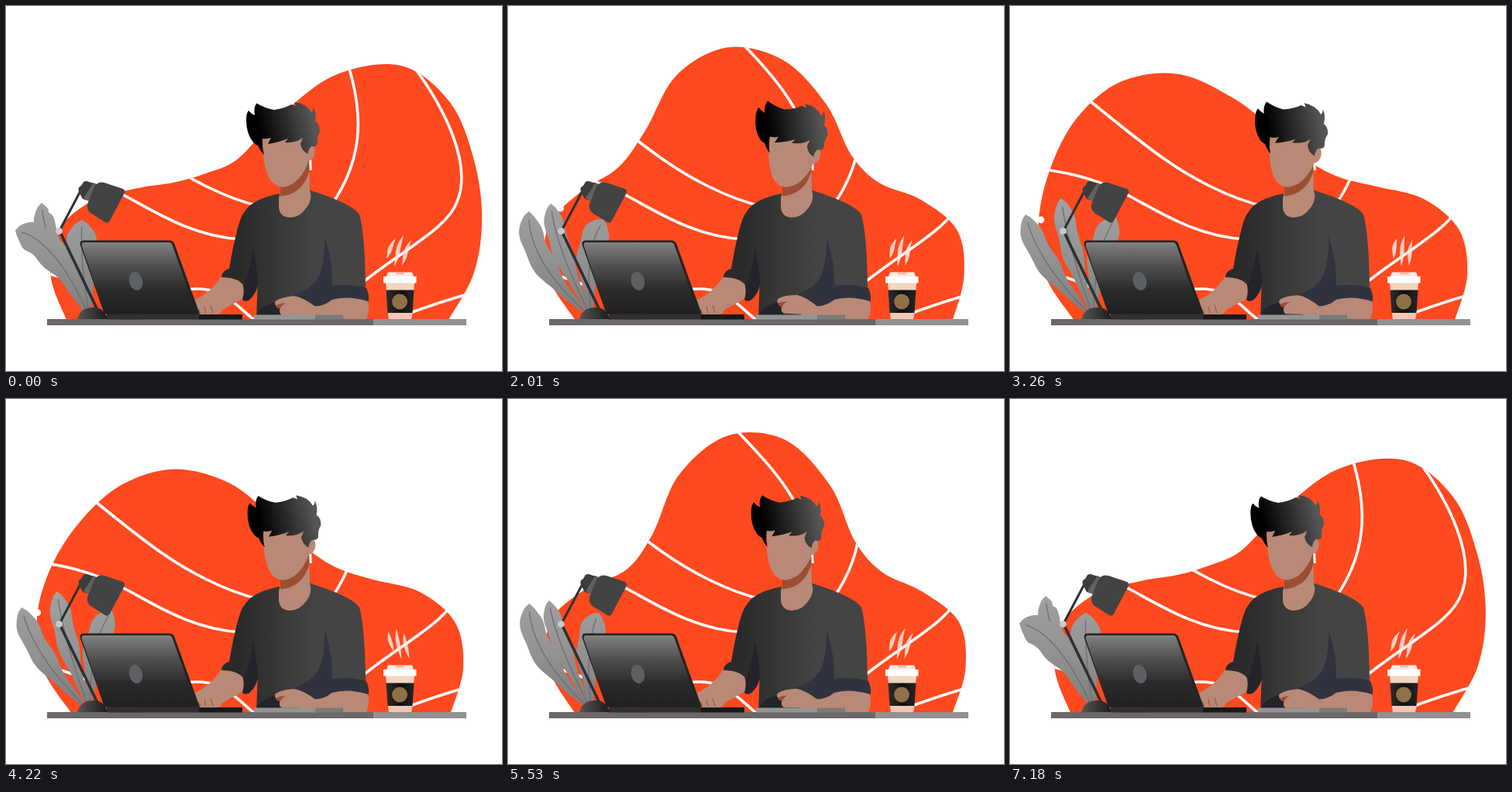
These frames come from a looping animation (640x471 px, 7200 ms). An HTML page with a canvas:

```html
<!DOCTYPE html>
<html lang="en">
<head>
<meta charset="utf-8">
<title>Working at a desk</title>
<style>
html, body { margin: 0; width: 100%; height: 100%; overflow: hidden; background: #fff; }
canvas { display: block; width: 640px; height: 471px; }
</style>
</head>
<body>
<canvas id="stage"></canvas>
<script>
const LOOP = 7200, W = 640, H = 471;
const canvas = document.getElementById('stage');
const ratio = window.devicePixelRatio || 1;
canvas.width = W * ratio;
canvas.height = H * ratio;
const ctx = canvas.getContext('2d');

const lerp = (a, b, k) => a + (b - a) * k;
// 0 -> 1 -> 0 at constant speed
const wave = (t, period) => 1 - Math.abs(1 - 2 * (t % period) / period);

// Straight blend between evenly spaced poses
function blend(poses, pos) {
  const i = Math.min(poses.length - 2, Math.floor(pos));
  const k = Math.min(1, pos - i);
  return poses[i].map((v, j) => lerp(v, poses[i + 1][j], k));
}

// Smooth open path through [x, y] points
function spline(pts) {
  const path = new Path2D();
  const at = i => pts[Math.max(0, Math.min(pts.length - 1, i))];
  path.moveTo(...pts[0]);
  for (let i = 0; i < pts.length - 1; i++) {
    const a = at(i - 1), b = at(i), c = at(i + 1), d = at(i + 2);
    path.bezierCurveTo(b[0] + (c[0] - a[0]) / 6, b[1] + (c[1] - a[1]) / 6,
      c[0] - (d[0] - b[0]) / 6, c[1] - (d[1] - b[1]) / 6, c[0], c[1]);
  }
  return path;
}

const toPath = shape => typeof shape === 'string' ? new Path2D(shape) : shape;

function fill(shape, style) {
  ctx.fillStyle = style;
  ctx.fill(toPath(shape));
}

function stroke(shape, style, width) {
  ctx.strokeStyle = style;
  ctx.lineWidth = width;
  ctx.stroke(toPath(shape));
}

function rect(x, y, w, h, style) {
  ctx.fillStyle = style;
  ctx.fillRect(x, y, w, h);
}

function disc(x, y, r, style) {
  ctx.fillStyle = style;
  ctx.beginPath();
  ctx.arc(x, y, r, 0, 7);
  ctx.fill();
}

function gradient(x0, y0, x1, y1, ...colors) {
  const g = ctx.createLinearGradient(x0, y0, x1, y1);
  colors.forEach((c, i) => g.addColorStop(i / (colors.length - 1), c));
  return g;
}

// ---- Background blob: radii every 12 degrees, left to right, one row per 900 ms ----
const hills = [
  [242, 268, 278, 260, 228, 205, 199, 208, 258, 331, 379, 378, 351, 322, 290, 251],
  [239, 268, 287, 281, 250, 241, 261, 314, 322, 290, 265, 267, 281, 304, 291, 252],
  [233, 274, 291, 270, 249, 271, 333, 367, 360, 312, 254, 240, 263, 284, 274, 254],
  [234, 277, 303, 314, 318, 326, 328, 309, 261, 230, 219, 231, 265, 285, 276, 254],
  [240, 284, 314, 342, 369, 372, 337, 273, 231, 206, 208, 231, 265, 284, 276, 254]
];

const bands = [
  'M20 208C70 213 110 222 150 243S240 298 305 301',
  'M70 95C130 145 170 177 200 198S280 248 330 259',
  'M285 30C330 78 392 135 393 212',
  'M436 60C465 140 462 205 410 270',
  'M520 70C570 135 600 205 583 250C572 285 520 310 465 353L440 371',
  'M610 368Q560 381 500 404',
  'M45 343Q80 351 110 365',
  'M225 367C275 358 290 380 320 405'
].map(toPath);

function drawBlob(tau) {
  const shape = spline(blend(hills, tau / 900).map((r, i) => {
    const a = Math.PI * i / 15;
    return [320 - r * Math.cos(a), 405 - r * Math.sin(a)];
  }));
  fill(shape, '#ff491f');
  ctx.save();
  ctx.clip(shape);
  bands.forEach(b => stroke(b, '#fff', 3.6));
  ctx.restore();
}

// ---- Plant: each pose is tip x, y, bend x, y and half width, one per 1000 ms ----
const ROOT = [108, 402];
const leaves = [
  [[98, 276, 95, 330, 20], [103, 275, 100, 330, 15], [124, 276, 96, 312, 18], [137, 273, 108, 312, 16]],
  [[46, 254, 48, 310, 14], [48, 270, 62, 320, 10], [55, 255, 60, 310, 13], [66, 248, 74, 310, 14]],
  [[12, 290, 62, 297, 20], [28, 262, 32, 325, 16], [27, 265, 24, 330, 16], [20, 269, 34, 332, 15]]
];
const notch = [[59, 264], [51, 267], [68, 261], [40, 276]];

function drawLeaf([tx, ty, bx, by, width]) {
  const [rx, ry] = ROOT, steps = 24;
  const left = [], right = [], spine = [];
  for (let i = 0; i <= steps; i++) {
    const u = i / steps, v = 1 - u;
    const x = v * v * rx + 2 * u * v * bx + u * u * tx;
    const y = v * v * ry + 2 * u * v * by + u * u * ty;
    const dx = v * (bx - rx) + u * (tx - bx), dy = v * (by - ry) + u * (ty - by);
    const len = Math.hypot(dx, dy);
    const half = width * Math.max(0, Math.sin(Math.PI * u ** 1.6)) ** .6 * (1 + .1 * Math.sin(17 * u));
    left.push([x + dy / len * half, y - dx / len * half]);
    right.unshift([x - dy / len * half, y + dx / len * half]);
    if (u < .95) spine.push([x, y]);
  }
  fill(spline([...left, ...right]), gradient(0, 255, 0, 402, '#a0a0a0', '#929292', '#7c7c7c'));
  stroke(spline(spine), '#707070', 1.4);
}

function drawPlant(tau) {
  const pos = Math.min(3, tau / 1000);
  leaves.forEach(poses => drawLeaf(blend(poses, pos)));
  disc(...blend(notch, pos), 4.4, '#fff');
}

// ---- Still objects ----
function drawLamp() {
  ctx.lineCap = 'round';
  stroke('M69 290L97 237', '#2b3034', 3);
  stroke('M69 290L118 392', '#2b3034', 3.6);
  ctx.lineCap = 'butt';
  disc(68.5, 290.5, 4.4, '#c9c9c9');
  fill('M94 240Q92 234 97 232L100 227Q103 225 107 227L114 229L105 251L99 249Z', '#3c3c3c');
  fill('M113 228L119 231L107 252L100 248Z', '#606262');
  fill('M114 233Q119 226 127 228L151 236Q154 238 153 241L134 277Q132 281 128 279L109 267Q104 263 105 256Z', '#434343');
  fill('M92 404Q96 389 113 389Q127 389 131 404Z', gradient(92, 0, 130, 0, '#555', '#1d1d1d'));
}

function drawLaptop() {
  rect(130, 396.5, 119, 8, '#303030');
  rect(249, 398, 56, 6.5, '#191919');
  fill('M100 302.5H211Q215 302.5 217 306L250 397.5H127L96 309Q94 303 100 302.5Z', '#232323');
  fill('M101 305H210Q213 305 214.5 308L246 397H127.5L98 310Q96.500 305 101 305Z',
    gradient(0, 303, 0, 397, '#858585', '#515151', '#2b2b2b', '#202020'));
  ctx.fillStyle = '#5c6062';
  ctx.beginPath();
  ctx.ellipse(167.5, 355, 8.6, 12.2, -.25, 0, 7);
  ctx.fill();
}

function drawDesk() {
  rect(53, 404, 421, 8, '#6c6868');
  rect(474, 404, 120, 8, '#939191');
  rect(144, 404, 32, 1, '#70544c');
  rect(320, 398.5, 79, 6, '#949494');
  rect(399, 398.5, 36, 6, '#7b7b7b');
}

function drawCup() {
  fill('M490 357H527L523 404H494Z', '#f2d6c0');
  fill('M493 396H524.5L523 404H494Z', '#f5c6b6');
  fill('M490.5 366.5H526.5L524.5 396H492.5Z', gradient(491, 0, 527, 0, '#2c2c2c', '#101010', '#262626'));
  fill('M493 343.5H524L526.5 350H490.5Z', '#ffece4');
  fill('M502 344H515L513 346.5H504Z', '#f6b9a8');
  rect(487, 349, 42.5, 8.5, '#fff');
  disc(508, 381.5, 10, '#8f7047');
}

function drawSteam(t) {
  const lean = 6 * Math.cos(2 * Math.PI * t / 1800);
  [[497, 300, 326], [507, 296, 336], [517, 302, 335]].forEach(([x, top, end]) => {
    const h = end - top, p = new Path2D();
    p.moveTo(x + lean, top);
    p.bezierCurveTo(x - 6, top + h * .35, x - 4, top + h * .6, x - lean, end);
    p.bezierCurveTo(x + 3, top + h * .65, x + 1, top + h * .4, x + lean, top);
    fill(p, 'rgba(255,236,230,.82)');
  });
}

// ---- Person ----
const SKIN = '#b88976';

function turned(x, y, angle, draw) {
  ctx.save();
  ctx.translate(x, y);
  ctx.rotate(angle);
  ctx.translate(-x, -y);
  draw();
  ctx.restore();
}

function drawHead() {
  fill('M331 168L332 195Q335 217 343 227Q350 234 359 233.5Q373 231 382 217Q388 208 390 200Q397 199 398.5 189Q399 181 394 180L385 165Z', SKIN);
  fill('M333 192Q328 187 325 180Q322 179 319 176Q310 165 310 147Q310 138 313 135Q316 139 321 141Q319 131 323.5 125.5' +
    'Q334 132 346 134Q360 132 368 127L374 129Q373 126 372 124Q388 126 394 137Q397 135 396.5 130Q401 139 399 149' +
    'Q405 152 405 162Q401 168 402 177Q401 182 394 181Q390 185 390 191Q382 188 380 178L383 170Q374 177 360 176L364 171' +
    'Q352 176 338 178L342 170Q336 172 331 171Q330 182 333 192Z', gradient(326, 158, 394, 142, '#000', '#2a2a2a', '#555'));
}

function drawHand() {
  fill('M401 389Q384 376 372 374Q356 375 348 380Q346 383 348 386L354 388Q351 396 356 398.5H402Z', SKIN);
  fill('M348 386Q354 383 361 383Q355 386 354 390Q349 390 348 386Z', '#9c4e35');
}

function drawPerson(t) {
  const sway = wave(t, 1440);
  fill('M278 349L304 354Q309 367 305 378L279 392Q277 399 270 398H248L244 379Q263 371 278 349Z', SKIN);
  stroke('M256 388L258 396M264 386L267 396M248 391L251 397', '#9c5a45', 1.2);
  fill('M318 300L327 344Q327 369 313 380Q307 382 305 379Q309 366 304 355L297 340Z', '#22242a');
  fill('M353 242Q330 246 315 257Q304 267 300 283Q293 308 288 339Q278 342 278 350Q299 350 307 361Q316 336 319 311L325 351L323 404H465' +
    'L464 362Q463 294 456 269Q447 255 393 238Z', gradient(300, 0, 400, 0, '#2a2a2a', '#444'));
  fill('M411 297Q422 331 421 361Q447 358 465 364Q470 375 467 383Q440 374 420 379Q406 389 396 388Q384 377 370 373' +
    'Q393 366 403 350Q412 331 411 297Z', '#30333d');
  fill('M324 398Q329 387 349 382L356 398.5H324Z', '#22242a');
  fill('M391 198L392 238Q396 249 388 260Q379 273 366 273Q352 272 352 258V248L356 232Z', SKIN);
  fill('M354 233Q370 233 381 218Q389 208 391 196L391.5 213Q383 243 354 245.5Z', '#9c4e35');
  fill('M397 387.5Q410 388 421 379Q441 373 467 381Q470 393 465 404H378V397Z', SKIN);
  turned(398, 390, sway * .07 - .01, drawHand);
  turned(357, 235, sway * .133, drawHead);
}

function frame(now) {
  const t = Math.max(0, now - start) % LOOP;
  const tau = Math.min(t, LOOP - t);
  ctx.setTransform(ratio, 0, 0, ratio, 0, 0);
  rect(0, 0, W, H, '#fff');
  drawBlob(tau);
  drawSteam(t);
  drawPlant(tau);
  drawLamp();
  drawPerson(t);
  drawDesk();
  drawLaptop();
  drawCup();
  requestAnimationFrame(frame);
}

const start = performance.now();
frame(start);
</script>
</body>
</html>
```
